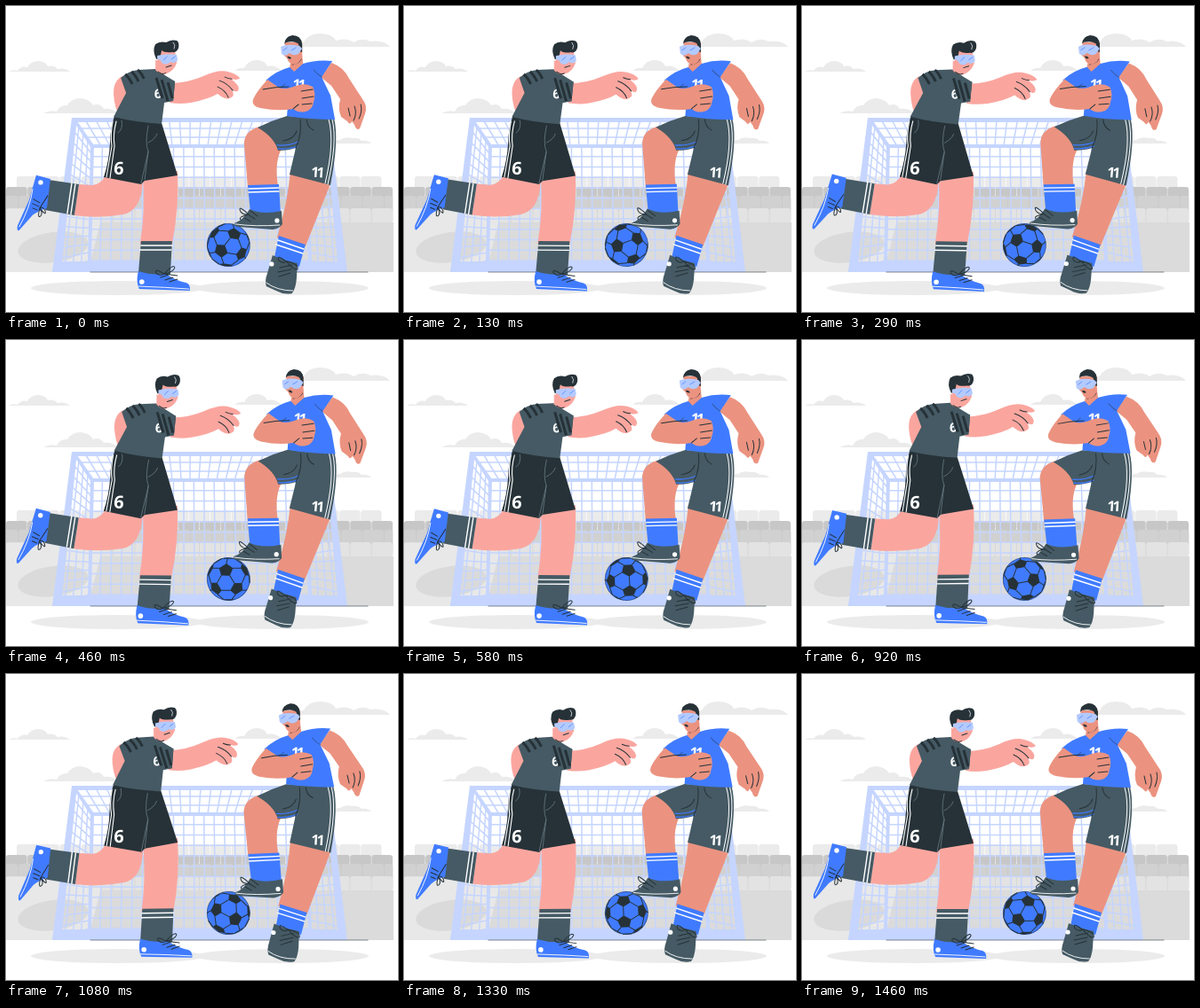
Write an HTML page that moves like this. It is 441 px wide and 345 px high and loops after 1.5 s.

```html
<!DOCTYPE html>
<html lang="en">
<head>
<meta charset="utf-8">
<title>Football players</title>
<style>
html, body { margin: 0; width: 100%; height: 100%; overflow: hidden; background: #fff; }
svg { display: block; width: 100vw; height: 100vh; }
.line { fill: none; stroke-linecap: round; stroke-linejoin: round; }
.ink { stroke: #263238; stroke-width: 1; }
.white { stroke: #fff; stroke-width: 1.4; }
.net { stroke: #c5d5ff; stroke-width: 1.5; }
.bar { fill: #c5d5ff; }
.cloud { fill: #ebebeb; }
.dark { fill: #263238; }
.slate { fill: #455a64; }
.blue { fill: #407bff; }
.pink { fill: #faa69f; }
.tan { fill: #eb9380; }
.lens { fill: #b3caff; }
text { fill: #fff; font-family: "Open Sans", "Noto Sans", sans-serif; font-weight: 700; text-anchor: middle; }
.pair { letter-spacing: -3px; }
</style>
</head>
<body>
<svg viewBox="0 0 441 345" xmlns="http://www.w3.org/2000/svg">
  <g class="cloud">
    <path d="M3 74Q8 71 13 73Q17 67 24 69Q28 62 37 62Q45 63 47 68Q54 66 58 71Q66 69 72 74Z"/>
    <path d="M42 121Q50 117 57 119Q61 111 69 112Q74 104 84 104Q94 105 98 112Q106 109 110 116Q120 115 126 121Z"/>
    <path d="M257 73Q262 69 268 70Q272 61 283 61Q292 62 294 68Q302 66 310 73Z"/>
    <path d="M324 46Q329 41 335 41Q340 31 353 31Q367 31 371 39Q383 35 391 41Q401 35 410 40Q425 38 432 46Z"/>
    <path d="M365 155Q371 151 376 151Q381 147 390 149Q396 148 400 152Q407 151 411 155Z"/>
  </g>
  <g id="seats"></g>
  <path fill="#dbdbdb" d="M0 244H436V300H0Z"/>
  <path fill="#e8e8e8" d="M0 229H110L92 300H0Z"/>
  <ellipse cx="53" cy="272" rx="40" ry="17" fill="#dadada" transform="rotate(-8 53 272)"/>
  <g fill="#ebebeb">
    <ellipse cx="126" cy="318" rx="98" ry="8"/>
    <ellipse cx="310" cy="318" rx="98" ry="8"/>
  </g>
  <path id="net" class="line net"/>
  <g class="bar">
    <path d="M74 126H363L364 131H74Z"/>
    <path d="M74 126H80L62 300H52Z"/>
    <path d="M358 126H363L384 300H374Z"/>
    <path d="M95 156H338V160H95Z"/>
    <path d="M95 157H99L96 288H92Z"/>
    <path d="M335 157H339L344 288H340Z"/>
    <path d="M74 127L78 127L99 157L95 159Z"/>
    <path d="M359 127H363L339 159L335 157Z"/>
    <path d="M55 288H381L383 300H52Z"/>
  </g>
  <path class="line ink" stroke-opacity=".7" style="stroke-width:.8" d="M95 300H407"/>

  <g id="ball">
    <circle r="24.4" class="blue"/>
    <path id="patches" class="dark"/>
    <path id="seams" class="line ink"/>
    <circle r="24" class="line ink" stroke-opacity=".45"/>
  </g>

  <g id="p2">
    <path class="tan" d="M320 186Q317 222 305 261L337 271Q354 228 366 198Z"/>
    <path class="blue" d="M307 259L337 269L330 294L302 284Z"/>
    <path class="line white" d="M306 264L335 274M304 269L334 279"/>
    <path class="slate" d="M300 281Q313 287 328 290L327 308Q326 319 322 324Q313 326 304 321L293 316Q291 310 294 302Z"/>
    <path class="line" stroke="#fff" stroke-width=".9" d="M293 312Q305 321 323 321"/>
    <path class="line ink" d="M308 295L322 292M306 300L321 297M307 305L320 301M315 288Q304 279 307 287Q311 291 316 288Q330 291 328 297Q322 297 316 288"/>
    <circle cx="299" cy="291" r="2.6" fill="#fff"/>

    <path class="tan" d="M285 136Q267 141 268 157L272 204L306 203Q302 178 309 163L318 140Z"/>
    <path class="blue" d="M272 202L307 201L309 234Q292 239 275 232Z"/>
    <path class="line white" d="M273 206L307 205M273 210L307 209"/>
    <path class="slate" d="M274 229Q288 236 310 231L311 246Q308 251 300 252L262 249Q256 249 257 245Q268 241 274 229Z"/>
    <path class="line" stroke="#fff" stroke-width=".9" d="M258 246Q280 249 308 247"/>
    <path class="line ink" d="M268 239L275 243M272 235L280 240M275 231L283 237M273 235Q260 223 264 232Q267 236 273 235Q261 238 264 241"/>
    <circle cx="305" cy="242" r="2.6" fill="#fff"/>

    <path class="slate" d="M316 124L369 127Q375 150 365 202L319 190L326 160Q318 163 306 163Q302 148 283 137Q299 129 316 124Z"/>
    <path class="line" stroke="#407bff" stroke-width="1.3" d="M305 157Q318 158 329 153M306 161Q318 162 328 158"/>
    <path class="line ink" d="M331 128Q333 145 326 160M327 141Q324 150 312 152M338 128Q339 137 346 140"/>
    <path class="line" stroke="#fff" d="M363 128Q370 153 359 200M367 128Q373 153 362 201"/>
    <text class="pair" x="349" y="193" font-size="16" transform="rotate(4 349 193)">11</text>

    <path class="tan" d="M354 80L366 64Q380 69 386 82L401 105Q407 113 404 121L398 138Q394 141 392 134L389 130Q387 135 384 130L377 125Q373 116 376 105L366 90Z"/>
    <path class="line ink" d="M399 111Q401 118 397 127M392 113Q395 121 391 129M385 115L387 124"/>
    <path class="blue" d="M292 84Q304 73 319 69L334 65Q350 60 367 62L355 80L365 101L370 128Q341 128 316 124L318 98L307 94Z"/>
    <path class="line" stroke="#263238" stroke-opacity=".45" d="M355 80Q350 77 346 72M307 94L314 88"/>
    <text class="pair" x="328" y="94" font-size="16" transform="rotate(4 328 94)">11</text>
    <path class="tan" d="M321 58L333 55L334 65L324 74L319 69Z"/>
    <path class="line ink" d="M322 66Q329 65 332 60"/>
    <path class="tan" d="M314 41L333 41L333 57Q331 64 325 66Q318 66 316 59L312 55Z"/>
    <path class="dark" d="M313 43Q313 35 322 33Q332 33 333 43L333 52L330 51L329 43Q325 39 315 41Z"/>
    <path class="lens" d="M309 46Q316 42 330 45L333 48L329 54Q323 57 319 53Q314 58 310 54Z"/>
    <path class="line" stroke="#407bff" stroke-width=".7" d="M312 50L316 47M321 50L326 47"/>
    <path class="dark" d="M316 57Q319 56 321 59Q318 61 316 57Z"/>
    <path class="tan" d="M294 83Q283 95 279 103Q274 112 286 115Q306 119 323 116Q329 121 337 119Q345 117 346 108Q349 99 345 91Q336 86 326 90Q314 95 307 92Z"/>
    <path class="line ink" d="M289 94Q303 91 318 91M332 96L345 94M333 104L346 102M333 111L344 110M323 116L329 111"/>
  </g>

  <g id="p1">
    <path class="pink" d="M134 78Q120 82 121 100Q122 114 127 123L144 108Z"/>
    <path class="pink" d="M112 190Q108 201 97 202L82 201L77 236Q104 240 132 235Q152 231 154 198Z"/>
    <path class="slate" d="M48 196L82 201L77 236L44 230Z"/>
    <path class="line white" d="M74 200L69 234M78 201L73 235"/>
    <path class="blue" d="M34 191L50 195L46 228Q36 231 30 236L15 253Q12 255 13 248L26 219Z"/>
    <path class="line" stroke="#fff" stroke-width=".9" d="M30 207Q27 228 15 249"/>
    <path class="line ink" d="M31 218L38 222M30 223L37 226M30 228L35 230M38 228Q46 238 44 231Q42 226 38 228Q35 240 39 237Q42 234 38 228L47 214"/>
    <circle cx="39" cy="199" r="2.7" fill="#fff"/>

    <path class="pink" d="M154 192L193 186Q195 228 187 268H151Q157 229 154 192Z"/>
    <path class="slate" d="M152 265H187L185 303H149Z"/>
    <path class="line white" d="M152 270H187M151 275H186"/>
    <path class="blue" d="M149 299Q165 304 180 302Q192 310 203 312Q208 314 207 321L150 319Q146 311 149 299Z"/>
    <path class="line" stroke="#fff" stroke-width=".9" d="M149 316Q180 317 206 319"/>
    <path class="line ink" d="M174 306L183 303M179 309L188 306M184 311L193 308M178 302Q167 295 169 301Q173 305 178 302Q189 290 190 295Q188 300 178 302L193 304"/>
    <circle cx="153" cy="311" r="2.8" fill="#fff"/>

    <path class="dark" d="M122 124L175 132L183 158L193 191L156 197L152 201L110 193Q116 175 117 154Q117 138 122 124Z"/>
    <path class="line" stroke="#6a7b84" stroke-width=".8" d="M160 135Q156 154 160 164L152 200M160 154Q168 150 170 144M130 129Q132 139 126 143M160 164L156 196"/>
    <path class="line" stroke="#fff" stroke-width="1.1" d="M120 130Q117 145 119 158L113 193M124 130Q120 145 122 158L117 194"/>
    <text x="126.5" y="190" font-size="20" transform="rotate(4 127 190)">6</text>

    <path class="pink" d="M184 87Q204 87 222 79Q239 71 250 74Q259 76 263 81Q261 84 253 82Q264 90 261 95Q259 98 254 94Q258 101 253 103Q247 107 238 99Q228 105 208 109Q195 111 184 109Z"/>
    <path class="line ink" d="M240 84Q249 87 255 95M238 91Q247 95 250 103M246 80Q250 82 254 82"/>
    <path class="slate" d="M129 81Q138 73 149 72L168 71L180 79L190 85L188 107L178 109L175 133Q145 131 121 125L135 98Z"/>
    <text x="171" y="104" font-size="15">6</text>
    <path class="slate" d="M168 80L190 85L188 107L177 108L172 99Z"/>
    <path class="line" stroke="#263238" stroke-width="3" style="stroke-linecap:butt" d="M134 77Q138 80 142 88M141 74Q145 77 149 85M148 72Q152 75 155 82M169 81L176 104M175 83L182 107M182 86L187 104"/>
    <path class="pink" d="M168 61L182 65L181 76Q174 79 168 72Z"/>
    <path class="line ink" d="M171 74Q177 79 181 74"/>
    <path class="pink" d="M171 50L190 51L192 64Q189 73 181 76Q173 73 170 63Z"/>
    <path class="dark" d="M169 60Q164 50 168 43Q173 39 180 41Q186 37 192 39Q195 41 194 47Q192 53 187 52Q178 53 175 50L173 59Z"/>
    <path class="line" stroke="#fff" stroke-width=".7" d="M188 41Q191 44 189 48"/>
    <path class="lens" d="M170 56Q181 53 192 55L193 61Q190 66 185 63Q180 68 175 64Q174 60 170 60Z"/>
    <path class="line" stroke="#407bff" stroke-width=".7" d="M177 61L181 57M186 60L190 57"/>
    <path class="line ink" d="M180 69Q183 68 186 67"/>
  </g>
</svg>
<script>
const LOOP = 1500, LEAD = 25;
const el = id => document.getElementById(id);

function seatRow(x0, x1, y, w, h, color) {
  let out = "";
  for (let x = x0; x < x1; x += w) {
    const width = Math.min(w, x1 - x) - 0.6;
    out += `<rect x="${x}" y="${y}" width="${width}" height="${h}" rx="3" fill="${color}"/>`;
  }
  return out;
}

const mix = (p, q, k) => p.map((v, i) => v + (q[i] - v) * k);

// Straight-line mesh across the quad a-b-c-d, with n columns and m rows.
function mesh(a, b, c, d, n, m) {
  const seg = (p, q) => `M${p}L${q}`;
  let path = "";
  for (let i = 0; i <= n; i++) path += seg(mix(a, b, i / n), mix(d, c, i / n));
  for (let j = 0; j <= m; j++) path += seg(mix(a, d, j / m), mix(b, c, j / m));
  return path;
}

el("seats").innerHTML =
  seatRow(12, 423, 192, 24.2, 20, "#ebebeb") +
  seatRow(0, 436, 204, 24.2, 30, "#c7c7c7") +
  seatRow(-10, 436, 214, 24.2, 30, "#d1d1d1") +
  seatRow(0, 436, 228, 24.2, 18, "#e3e3e3");

el("net").setAttribute("d",
  mesh([97, 158], [337, 158], [342, 287], [94, 287], 21, 11) +
  mesh([77, 128], [361, 128], [337, 158], [97, 158], 24, 3) +
  mesh([77, 128], [97, 158], [94, 287], [57, 297], 4, 14) +
  mesh([361, 128], [337, 158], [342, 287], [379, 297], 4, 14));

// The ball is a truncated icosahedron seen from the front.
function buildBall(radius, tilt, lean, roll) {
  const turn = (v, i, j, a) => {
    const w = [...v], c = Math.cos(a), s = Math.sin(a);
    w[i] = v[i] * c - v[j] * s;
    w[j] = v[i] * s + v[j] * c;
    return w;
  };
  const project = v => {
    const n = Math.hypot(v[0], v[1], v[2] > 0 ? v[2] : 0);
    return [v[0] / n * radius, v[1] / n * radius];
  };
  const phi = (1 + Math.sqrt(5)) / 2, verts = [];
  for (const a of [-1, 1]) for (const b of [-phi, phi])
    verts.push([0, a, b], [a, b, 0], [b, 0, a]);
  const pts = verts.map(v => turn(turn(turn(v, 2, 0, tilt), 2, 1, lean), 0, 1, roll));
  let patches = "", seams = "";
  for (const v of pts) {
    const near = pts.filter(q => q !== v && Math.hypot(...q.map((k, i) => k - v[i])) < 2.1);
    const mid = project(v);
    if (v[2] > -0.3) {
      const ring = near.map(q => project(mix(v, q, 1 / 3)));
      ring.sort((p, q) => Math.atan2(p[1] - mid[1], p[0] - mid[0]) - Math.atan2(q[1] - mid[1], q[0] - mid[0]));
      patches += `M${ring.join("L")}Z`;
    }
    for (const q of near) {
      const p1 = mix(v, q, 1 / 3), p2 = mix(v, q, 2 / 3);
      if (p1[2] + p2[2] > 0) seams += `M${project(p1)}L${project(p2)}`;
    }
  }
  el("patches").setAttribute("d", patches);
  el("seams").setAttribute("d", seams);
}
buildBall(24.2, -0.14, -0.1, 0.56);

// One degree each way, at constant speed between the extremes.
function sway(p) {
  if (p < 0.25) return p * 4;
  return p < 0.75 ? 2 - p * 4 : p * 4 - 4;
}

function draw(ms) {
  const p = (ms + LEAD) % LOOP / LOOP;
  const a = sway(p);
  el("p1").setAttribute("transform", `rotate(${a} 138 180)`);
  el("p2").setAttribute("transform", `rotate(${a} 331 179)`);
  el("ball").setAttribute("transform", `translate(250.3 269.5) rotate(${p * 360})`);
}

const start = performance.now();
function tick() {
  draw(performance.now() - start);
  requestAnimationFrame(tick);
}
tick();
</script>
</body>
</html>
```
